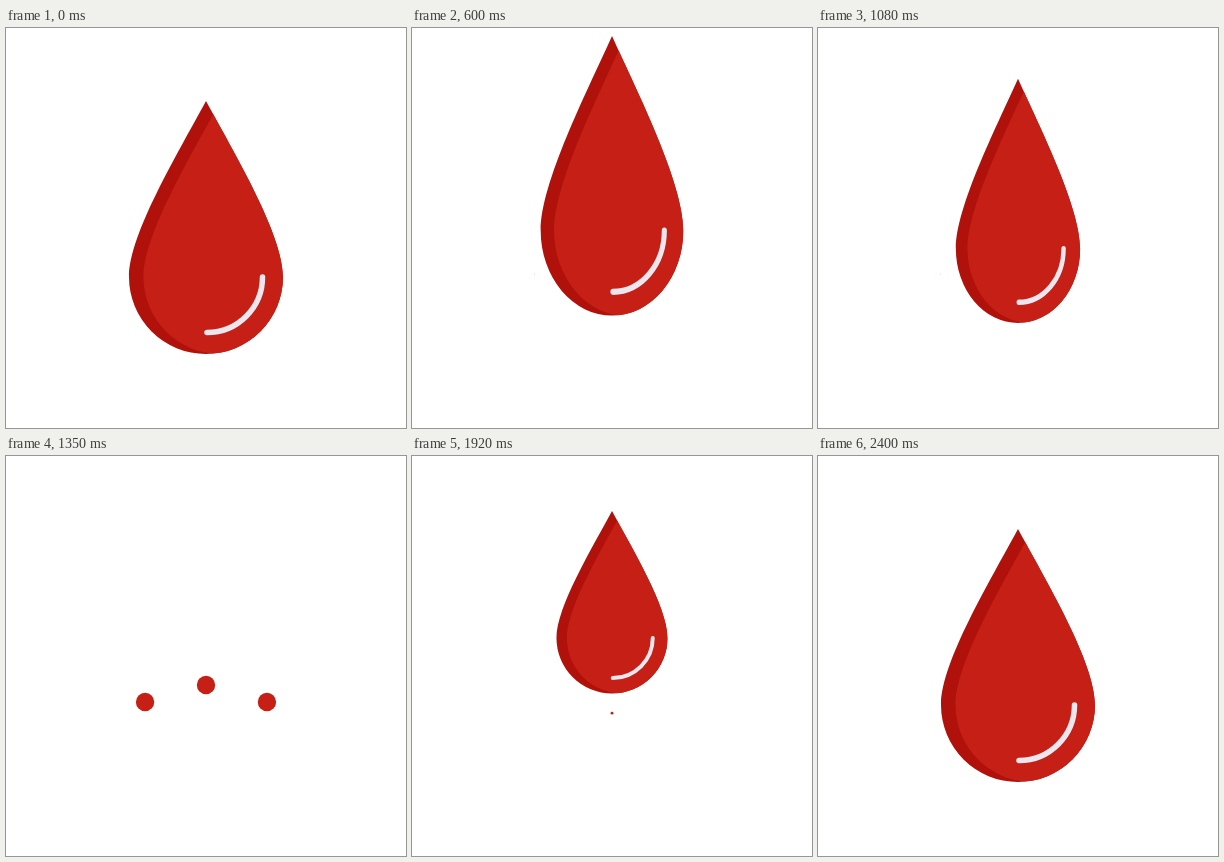
An HTML page for the animation above (4.46 s loop, 400 px wide and 400 px high).

```html
<!DOCTYPE html>
<html lang="en">
<head>
<meta charset="utf-8">
<title>Falling drop</title>
<style>
  html, body { margin: 0; width: 100%; height: 100%; overflow: hidden; background: #fff; }
  svg { display: block; width: 100vw; height: 100vh; }
</style>
</head>
<body>
<svg viewBox="0 0 400 400">
  <defs>
    <path id="shape" d="M200 73C228 125 277 206 277 249A77 77 0 0 1 123 249C123 206 172 125 200 73Z"/>
    <clipPath id="inside"><use href="#shape"/></clipPath>
  </defs>
  <g fill="#c62016">
    <circle class="dot"/>
    <circle class="dot"/>
    <circle class="dot"/>
  </g>
  <g id="drop">
    <use href="#shape" fill="#b0110a"/>
    <g clip-path="url(#inside)"><use href="#shape" x="14.5" fill="#c62016"/></g>
    <path d="M256.5 249A55.5 55.5 0 0 1 201 304.5" fill="none" stroke="#ece6ee" stroke-width="5.5" stroke-linecap="round"/>
  </g>
</svg>
<script>
  const LOOP = 4460, STEP = 30, END = 2400;
  const RISE_END = 930, FALL = 937, SPLASH = 1250, GROW = 1620;
  const TOP = 73, BOTTOM = 326;
  const drop = document.getElementById('drop');
  const dots = [...document.querySelectorAll('.dot')];

  const clamp = v => Math.min(1, Math.max(0, v));
  const part = (t, from, to) => clamp((t - from) / (to - from));
  const easeOut = (u, power) => 1 - (1 - u) ** power;
  const mix = (a, b, u) => a + (b - a) * u;

  // side: direction, lift: upward speed, gone: time at which the dot has shrunk away
  const splash = [
    { side: -1, lift: 0.653, gone: 1890 },
    { side: 0, lift: 0.823, gone: 1995 },
    { side: 1, lift: 0.653, gone: 1890 }
  ];

  function poseDrop(t) {
    let top, bottom, width;
    if (t < SPLASH) {
      const up = easeOut(part(t, 0, RISE_END), 4);
      const size = 1 - part(t, FALL, SPLASH) ** 2.63;
      top = mix(350, mix(TOP, 7, up), size);
      bottom = mix(350, mix(BOTTOM, 287, up), size);
      width = mix(1, 0.925, up) * size;
    } else {
      width = easeOut(part(t, GROW, END), 2.63);
      top = mix(8.7, TOP, width);
      bottom = mix(8.7, BOTTOM, width);
    }
    const height = (bottom - top) / (BOTTOM - TOP);
    drop.setAttribute('visibility', width > 0 ? 'visible' : 'hidden');
    drop.setAttribute('transform',
      `matrix(${width} 0 0 ${height} ${200 * (1 - width)} ${top - TOP * height})`);
  }

  function poseDots(t) {
    const age = t - SPLASH;
    const spread = 147 * easeOut(clamp(age / 612), 3);
    splash.forEach(({ side, lift, gone }, i) => {
      const r = age < 0 ? 0 : 9.2 * (1 - part(t, 1500, gone));
      dots[i].setAttribute('cx', 200 + side * spread);
      dots[i].setAttribute('cy', 300 - lift * age + 0.001133 * age * age);
      dots[i].setAttribute('r', r);
    });
  }

  function draw(now) {
    const t = Math.min(END, Math.floor((now % LOOP) / STEP) * STEP);
    poseDrop(t);
    poseDots(t);
  }

  const start = performance.now();
  function tick() {
    draw(performance.now() - start);
    requestAnimationFrame(tick);
  }
  tick();
</script>
</body>
</html>
```
